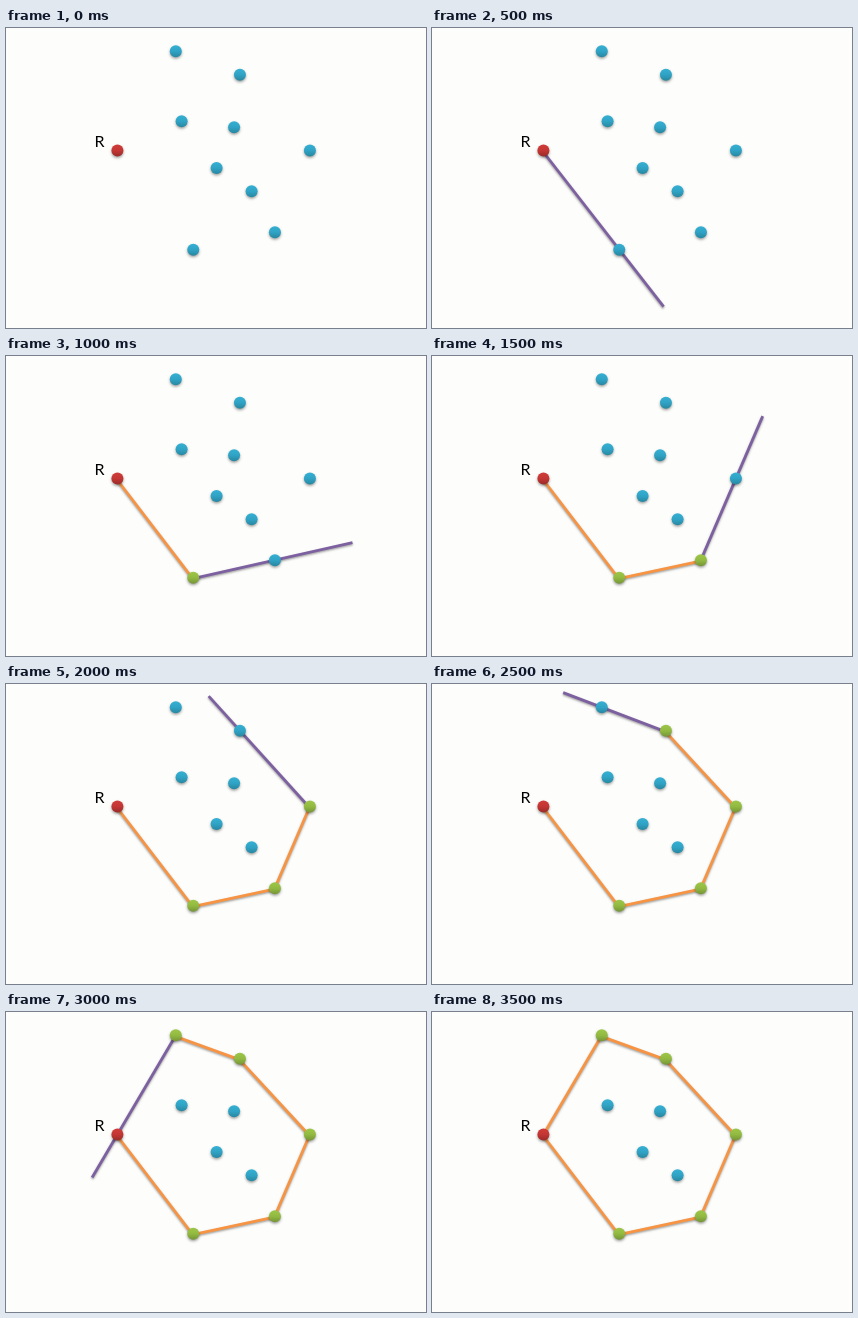
These frames come from a looping animation (420 by 300 pixels, 5000 ms). An HTML page with a canvas:

```html
<!DOCTYPE html>
<html lang="en">
<head>
<meta charset="utf-8">
<title>Gift wrapping</title>
<style>
  html, body { margin: 0; width: 100%; height: 100%; overflow: hidden; background: #fdfefc; }
  canvas { display: block; }
</style>
</head>
<body>
<canvas id="stage" width="420" height="300"></canvas>
<script>
const ctx = document.getElementById('stage').getContext('2d');
const LOOP = 5000, STEP = 500, GRID = 35 / 6;

// Points on a regular grid; the leftmost one, R, comes first
const points = ['19,21', '29,4', '40,8', '30,16', '39,17', '52,21', '36,24', '42,28', '46,35', '32,38']
  .map(s => s.split(',').map(Number))
  .map(([x, y]) => [0.6 + x * GRID, y * GRID]);

const RED = ['#d03c39', '#c33633', '#992b29'];
const BLUE = ['#35b0d3', '#30a3c5', '#2787a0'];
const GREEN = ['#9dc748', '#92ba41', '#769537'];

const cross = (p, q, r) => (q[0] - p[0]) * (r[1] - p[1]) - (q[1] - p[1]) * (r[0] - p[0]);

// The next hull point has every other point on the same side of the ray
const nextHull = p => points.reduce((q, r) => q === p || cross(p, q, r) > 0 ? r : q);

const hull = [];
for (let p = points[0]; !hull.includes(p); p = nextHull(p)) hull.push(p);
const corners = hull.map(([x, y]) => [x - 0.5, y + 1]);
const last = hull.length + 1;

// Rays overshoot the next point, further when heading right
function rayEnd([x, y], [tx, ty]) {
  const len = Math.hypot(tx - x, ty - y);
  const dx = (tx - x) / len, dy = (ty - y) / len;
  const over = 60 + 20 * dx;
  return [tx + over * dx, ty + over * dy];
}

function shadow(alpha, y, blur) {
  ctx.shadowColor = `rgba(0,0,0,${alpha})`;
  ctx.shadowOffsetY = y;
  ctx.shadowBlur = blur;
}

function line(path, color) {
  shadow(0.38, 1.3, 2.2);
  ctx.strokeStyle = color;
  ctx.lineWidth = 2.8;
  ctx.lineJoin = 'round';
  ctx.beginPath();
  path.forEach(p => ctx.lineTo(...p));
  ctx.stroke();
}

function dot([x, y], colors) {
  const fill = ctx.createLinearGradient(0, y - 6, 0, y + 6);
  colors.forEach((c, i) => fill.addColorStop(i / 2, c));
  shadow(0.38, 1.5, 2.8);
  ctx.fillStyle = fill;
  ctx.beginPath();
  ctx.arc(x, y, 6, 0, Math.PI * 2);
  ctx.fill();
}

function draw(step) {
  shadow(0, 0, 0);
  ctx.fillStyle = '#fdfefc';
  ctx.fillRect(0, 0, 420, 300);
  ctx.fillStyle = '#000';
  ctx.font = '16px Lato, sans-serif';
  ctx.fillText('R', 88.4, 119);

  if (step > 0 && step < last) {
    const from = corners[step - 1];
    line([from, rayEnd(from, hull[step % hull.length])], '#7d60a0');
  }
  if (step > 1) line([...corners, corners[0]].slice(0, step), '#f79443');

  const found = hull.slice(0, step);
  points.forEach((p, i) => dot(p, i === 0 ? RED : found.includes(p) ? GREEN : BLUE));
}

function frame(now) {
  draw(Math.min(last, Math.floor(now % LOOP / STEP)));
  requestAnimationFrame(frame);
}
draw(0);
requestAnimationFrame(frame);
</script>
</body>
</html>
```
